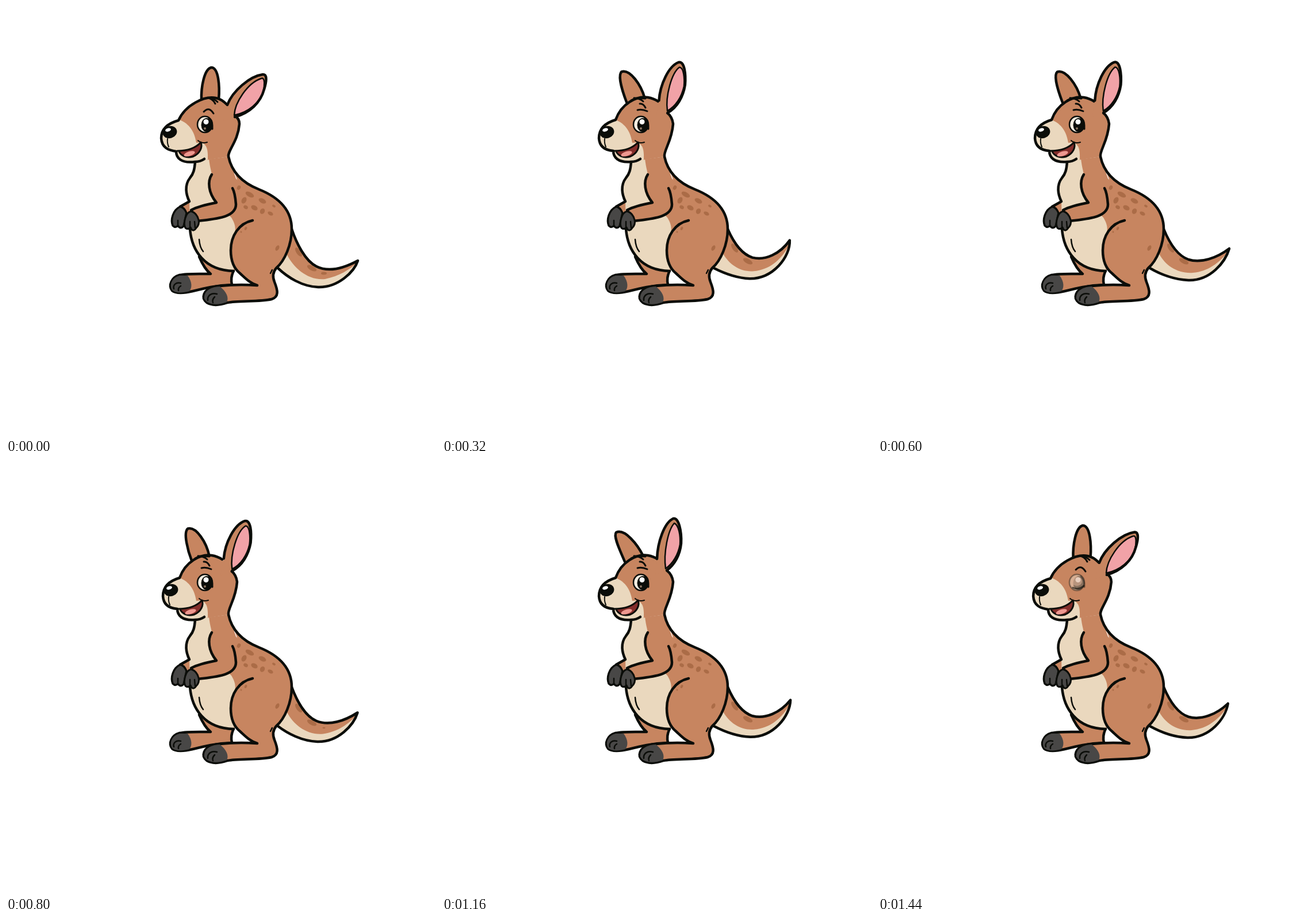
Write an HTML page with a canvas that moves like this. It is 748 by 748 pixels and loops after 1480 ms.

```html
<!DOCTYPE html>
<html lang="en">
<head>
<meta charset="utf-8">
<title>Kangaroo</title>
<style>
html, body { margin: 0; height: 100%; overflow: hidden; background: #fff; }
canvas { display: block; }
</style>
</head>
<body>
<canvas id="stage" width="748" height="748"></canvas>
<script>
const ctx = document.getElementById('stage').getContext('2d');
const FUR = '#c78560', CREAM = '#ead8be', INK = '#0b0d09', DARK = '#484746',
      PINK = '#f1a2a7', SPOT = '#ab6c47';
const LOOP = 1480, STEP = 40, OUTLINE = 4.5;

// Timelines: [ms, pose position]
const earTimes = [[0, 0], [160, 1], [440, 2], [600, 1.6], [800, 1.4], [1000, 1.75],
  [1160, 2], [1280, 1.6], [1440, .03]];
const tailTimes = [[0, 0], [160, 2], [440, 1.45], [600, 1], [800, .5], [1000, 1],
  [1280, 1.95], [1440, 1.25]];
const eyeTimes = [[0, 1], [1360, 1], [1440, .4]];

// Poses, blended point by point
const tail = [
  'M497 388C505 412 520 443 540 453C562 464 588 456 612 443C606 462 578 490 543 489C515 488 490 472 473 456',
  'M497 388C506 410 520 434 540 441C562 448 590 438 611 422C604 446 578 478 540 477C515 476 490 466 473 456',
  'M497 388C506 408 520 430 540 436C563 441 587 428 602 401C607 432 575 473 533 473C512 472 490 464 473 456'];
const tailCream = [
  'M465 465L489 433C500 455 525 478 555 475C580 470 600 458 614 443L614 500L465 500Z',
  'M465 465L489 431C500 452 522 466 548 464C574 462 596 446 613 422L613 500L465 500Z',
  'M465 465L489 431C500 449 518 462 540 460C568 457 590 440 606 401L614 500L465 500Z'];
const backEar = [
  'M340 165C339 140 345 110 357 107C370 107 372 140 370 163',
  'M326 166C320 150 315 115 325 108C340 106 355 135 356 160',
  'M318 170C312 155 297 126 303 119C318 112 340 140 350 160'];
const frontEar = [
  'M385 172C394 148 424 122 447 119C455 119 453 132 449 145C443 168 424 186 398 193',
  'M382 164C385 138 404 108 424 102C436 99 434 122 432 136C427 158 415 178 394 187',
  'M374 165C375 135 387 102 402 95C412 92 417 118 416 138C414 158 405 175 391 185'];
const innerEar = [
  'M397 190C398 168 420 134 444 126C451 123 450 140 447 150C440 169 422 185 397 190',
  'M396 183C393 158 408 118 425 111C432 108 432 128 430 140C425 159 413 177 396 183',
  'M389 182C385 155 393 115 404 103C412 106 415 125 414 140C411 157 402 173 389 182'];
const face = [
  'M385 172C378 165 372 161 365 160C345 156 312 172 300 199C282 204 270 213 270 230C271 246 282 251 296 253C296 264 304 274 329 271',
  'M376 166C370 162 364 160 358 159C338 156 312 170 302 198C285 203 273 213 273 230C274 246 285 251 298 252C298 263 306 273 329 271'];
const nape = [
  'M387 262C385 252 404 235 406 205C406 198 403 194 398 191',
  'M387 262C385 252 400 235 402 205C401 196 396 189 391 185'];

const chest = 'M329 270C328 285 326 292 320 299C310 312 313 328 319 340';
const belly = 'M320 388C323 425 345 460 396 461';
const torso = chest + 'L320 388' + belly.replace('M', 'L') + 'L420 400L440 340L400 300L387 262Z';
const leg = 'M429 373C405 378 391 400 391 425C391 444 397 457 407 465C416 473 424 482 437 486' +
  'C410 484 390 485 372 487C352 488 342 498 344 509C349 522 368 522 385 516C405 512 440 515 462 510' +
  'C475 506 473 495 467 480C463 470 465 462 470 456C485 443 497 415 497 388' +
  'C497 355 475 333 440 319C407 306 392 286 387 262';

// x, y, radius x, radius y
const spots = [[405, 316, 3, 4], [424, 328, 8, 4], [446, 339, 7, 4], [414, 338, 4, 6],
  [417, 350, 4, 3], [432, 351, 6, 4], [446, 357, 4, 5], [460, 361, 5, 3], [466, 348, 3, 2],
  [417, 387, 2, 3], [409, 393, 1.5, 1.5], [472, 421, 3, 5]];

function sample(keys, t) {
  const i = keys.findLastIndex(k => k[0] <= t), [t0, v0] = keys[i];
  if (!keys[i + 1]) return v0;
  const [t1, v1] = keys[i + 1];
  return v0 + (v1 - v0) * (t - t0) / (t1 - t0);
}

function blend(poses, at) {
  const i = Math.min(Math.floor(at), poses.length - 2);
  const next = poses[i + 1].match(/[\d.]+/g);
  let n = 0;
  return poses[i].replace(/[\d.]+/g, v => +v + (next[n++] - v) * (at - i));
}

function shape(d, fill, width = 0) {
  const path = new Path2D(d);
  if (fill) { ctx.fillStyle = fill; ctx.fill(path); }
  if (width) { ctx.lineWidth = width; ctx.strokeStyle = INK; ctx.stroke(path); }
}

function oval(x, y, rx, ry, fill, turn = 0, width = 0) {
  ctx.beginPath();
  ctx.ellipse(x, y, rx, ry, turn, 0, 7);
  ctx.fillStyle = fill;
  ctx.fill();
  if (width) { ctx.lineWidth = width; ctx.strokeStyle = INK; ctx.stroke(); }
}

function clipped(mask, draw) {
  ctx.save();
  ctx.clip(new Path2D(mask));
  draw();
  ctx.restore();
}

function drawTail(at) {
  const d = blend(tail, at);
  shape(d, FUR);
  clipped(d, () => {
    shape(blend(tailCream, at), CREAM);
    const drop = Math.max(0, 1 - at);
    oval(509, 421 + 7 * drop, 4, 9, SPOT, -.6);
    oval(532, 444 + 12 * drop, 9, 4, SPOT, .5);
    if (drop) oval(553, 453 + 12 * drop, 5 * drop, 2.5 * drop, SPOT);
  });
  shape(d, null, OUTLINE);
}

function drawBody() {
  shape('M336 436C342 450 348 460 356 466C335 466 315 465 302 468C288 472 282 486 289 495' +
    'C296 501 312 499 325 496C345 491 365 486 393 485C391 476 392 470 396 460', FUR, OUTLINE);
  shape('M316 469C324 480 324 490 319 496C305 500 294 499 289 494C283 484 290 472 302 469Z', DARK);
  shape('M292 492C290 485 296 480 304 482M300 495Q299 490 304 487', null, 2.5);
  shape('M319 340L301 350L312 364L322 354Z', FUR);
  shape(torso, FUR);
  clipped(torso, () => shape('M300 255L352 255C354 280 357 285 358 293C350 320 360 330 366 342' +
    'L392 368C398 378 400 385 398 395L396 470L300 470Z', CREAM));
  shape(chest + 'L303 349' + belly, null, OUTLINE);
  shape('M336 406Q337 420 343 427', null, 2.5);
  shape(leg, FUR, OUTLINE);
  shape('M372 488C384 497 388 508 384 515C368 521 350 520 345 509C344 498 352 489 372 488Z', DARK);
  shape('M351 512C350 504 357 498 367 501M360 516Q358 511 363 506M460 465L463 459', null, 2.5);
  for (const [x, y, rx, ry] of spots) oval(x, y, rx, ry, SPOT, .5);
}

function drawArms() {
  shape('M303 349C290 355 286 372 290 382Q295 387 299 382Q303 389 309 383L314 360Q310 350 303 349Z', DARK, 3.5);
  shape('M299 373L299 382', null, 2.5);
  shape('M358 293C350 305 352 325 366 342C350 345 335 348 322 355L334 374' +
    'C365 370 400 368 400 345C399 332 398 324 394 317', FUR, OUTLINE);
  shape('M322 357C312 359 308 378 312 386Q317 390 321 385Q325 395 331 386Q337 380 335 372Q332 360 322 357Z', DARK, 3);
  shape('M320 375L320 386M328 375L329 386', null, 2.5);
}

function drawEye(open) {
  ctx.globalAlpha = open;
  oval(346, 206, 13, 14, '#f6eee2', 0, 2.5);
  oval(349, 207, 9.5, 12, INK);
  shape('M353 195Q360 202 359 214', null, 3);
  ctx.globalAlpha = 1;
  oval(348, 201.5, 4.5, 4.5, '#fff');
  oval(346, 213, 2, 2, '#8a7462');
  if (open < 1) {
    ctx.globalAlpha = 1 - open;
    oval(346, 204, 9, 8, '#d9ad92');
    shape('M339 215Q348 220 358 212', null, 3);
    ctx.globalAlpha = 1;
  }
}

function drawHead(turn, eye) {
  const front = blend(face, turn), back = blend(nape, turn);
  const skull = front + back.replace('M', 'L') + 'Z';
  shape(skull, FUR);
  clipped(skull, () => shape('M296 196C318 202 328 218 331 238C340 236 352 238 351 262L352 290L260 290L260 196Z', CREAM));
  shape(front + back + 'M329 271Q338 271 345 266', null, OUTLINE);

  ctx.save();
  ctx.translate(2 * turn, 0);
  shape('M298 252C315 252 330 247 339 237C342 245 338 257 325 262C313 265 304 260 301 253', '#842e2b', 3);
  oval(319, 257, 10, 4, '#ee9890', -.3);
  shape('M334 234Q341 240 350 237M281 231Q280 238 283 245', null, 2);
  oval(285, 219.5, 12.5, 10.5, INK, -.3);
  oval(282, 215.5, 5, 3, '#fff', -.3);
  ctx.restore();

  drawEye(eye);
  if (turn < .5) shape('M344 184Q353 174 361 187M343 161Q357 157 364 170M354 160Q362 161 368 167', null, 3);
  else shape('M340 181Q348 179 357 183M344 170Q350 169 354 177M329 164Q340 157 350 166M334 160L354 161', null, 3);
}

function drawFrontEar(at) {
  const outer = blend(frontEar, at);
  shape(outer + 'l-20 8Z', FUR);
  shape(blend(innerEar, at), PINK, 2.5);
  shape(outer, null, OUTLINE);
}

function render(now) {
  const t = Math.floor(now % LOOP / STEP) * STEP;
  const ear = sample(earTimes, t);
  ctx.clearRect(0, 0, 748, 748);
  ctx.lineCap = ctx.lineJoin = 'round';
  drawTail(sample(tailTimes, t));
  shape(blend(backEar, ear), FUR, OUTLINE);
  drawBody();
  drawHead(Math.min(1, ear), sample(eyeTimes, t));
  drawArms();
  drawFrontEar(ear);
  requestAnimationFrame(render);
}
requestAnimationFrame(render);
</script>
</body>
</html>
```
